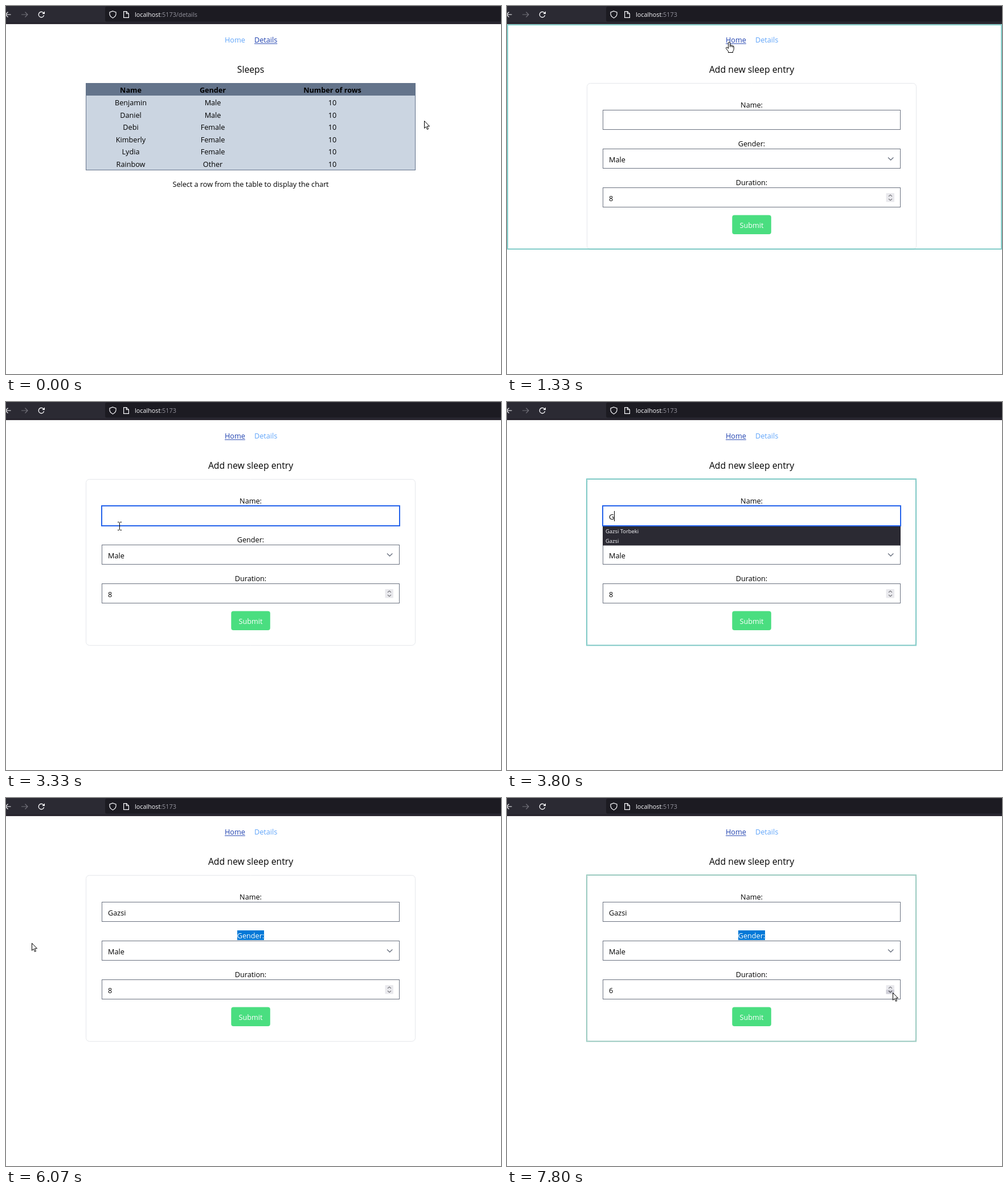
Animation of 869x645 px, one loop 8000 ms. Source, as an HTML page with a canvas:

```html
<!DOCTYPE html>
<html lang="en">
<head>
<meta charset="utf-8">
<title>Sleep entries</title>
<style>
  html, body { margin: 0; width: 100%; height: 100%; overflow: hidden; background: #fff; }
  canvas { display: block; }
</style>
</head>
<body>
<canvas id="stage" width="869" height="645"></canvas>
<script>
const ctx = document.getElementById('stage').getContext('2d');
const LOOP = 8000, TICKS_PER_SECOND = 15;
const FAMILY = '"Open Sans", "Noto Sans", sans-serif';
const BODY = 12.65, TITLE = 15.75, MID = 429.5;
const SLATE = '#64748b', SLATE_LIGHT = '#cbd5e1', SLATE_HOVER = '#94a3b8';
const LINK = '#60a5fa', LINK_HOVER = '#2563eb', LINK_ACTIVE = '#1e40af';
const FLASH = ['#37afa9', '#63b19e', '#80b393', '#97b488', '#abb67d'];

const NAME = 'Gazsi';
const SUGGESTIONS = ['Gazsi Torbeki', NAME];
const PEOPLE = [['Benjamin', 'Male'], ['Daniel', 'Male'], ['Debi', 'Female'],
  ['Kimberly', 'Female'], ['Lydia', 'Female'], ['Rainbow', 'Other']];

// Event times in ticks
const OPEN_HOME = 20, FOCUS = 40, BLUR = 87, MOVE_AGAIN = 82;
const KEYS = [56, 60, 64, 67, 72], KEYS_END = 77;
const CLICKS = [114, 117];

// Pointer path: tick, x, y
const PATH = [
  [0, 734, 201], [1, 720, 197], [4, 600, 150], [7, 362, 62], [8, 354, 70],
  [9, 354, 70], [12, 372, 66], [17, 390, 63], [21, 390, 63], [24, 360, 105],
  [29, 296, 180], [32, 288, 192], [39, 288, 192], [40, 215, 210], [42, 199, 217],
  [81, 199, 217], [82, 199, 213], [83, 172, 230], [84, 55, 253], [86, 55, 253],
  [89, 10, 256], [91, 45, 254], [95, 400, 287], [99, 640, 317], [104, 667, 335],
  [109, 677, 341]
];

function pointerAt(tick) {
  const i = PATH.findIndex(p => p[0] > tick);
  if (i < 0) return PATH[PATH.length - 1].slice(1);
  const [t0, x0, y0] = PATH[i - 1], [t1, x1, y1] = PATH[i];
  const k = (tick - t0) / (t1 - t0);
  return [Math.round(x0 + (x1 - x0) * k), Math.round(y0 + (y1 - y0) * k)];
}

const countUpTo = (list, tick) => list.filter(t => t <= tick).length;

function rect(x, y, w, h, color) {
  ctx.fillStyle = color;
  ctx.fillRect(x, y, w, h);
}

function frame(x, y, w, h, color, width = 1) {
  ctx.strokeStyle = color;
  ctx.lineWidth = width;
  ctx.strokeRect(x, y, w, h);
}

function roundBox(x, y, w, h, r) {
  ctx.beginPath();
  ctx.roundRect(x, y, w, h, r);
}

function text(str, x, y, { size = BODY, color = '#000', align = 'left', weight = 400 } = {}) {
  ctx.font = `${weight} ${size}px ${FAMILY}`;
  ctx.textAlign = align;
  ctx.fillStyle = color;
  ctx.fillText(str, x, y);
  return ctx.measureText(str).width;
}

const centered = (str, x, y, opts) => text(str, x, y, { align: 'center', ...opts });

function line(points, color, width = 1.2) {
  ctx.beginPath();
  points.forEach(([x, y]) => ctx.lineTo(x, y));
  ctx.strokeStyle = color;
  ctx.lineWidth = width;
  ctx.stroke();
}

function strokePath(d, color, width = 1.2) {
  ctx.strokeStyle = color;
  ctx.lineWidth = width;
  ctx.stroke(new Path2D(d));
}

function toolbar(home) {
  const light = '#fbfbfe', dim = '#73727b';
  rect(0, 0, 869, 30, '#2b2a33');
  ctx.fillStyle = '#1c1b22';
  roundBox(174, 1, 710, 26.5, 3);
  ctx.fill();
  rect(0, 30, 869, 1.6, '#0f0b14');

  strokePath('M-2 15H8.5M3.5 10.5L-1 15L3.5 19.5', light);
  strokePath('M27 15H38M33.5 10.5L38 15L33.5 19.5', dim);
  ctx.beginPath();
  ctx.arc(62, 15, 4.7, 0.25, Math.PI * 1.78);
  ctx.strokeStyle = light;
  ctx.lineWidth = 1.4;
  ctx.stroke();
  ctx.fillStyle = light;
  ctx.fill(new Path2D('M68 9.3V14H63.3Z'));

  strokePath('M187.5 9L193 11V14.5Q192.5 18.5 187.5 21Q182.5 18.5 182 14.5V11Z', light);
  strokePath('M206.6 9.6H211.5L215.4 13.4V20.4H206.6ZM211.4 9.6V13.5H215.4', light);

  const w = text('localhost', 226, 19, { size: 10.8, color: light });
  text(home ? ':5173' : ':5173/details', 226 + w, 19, { size: 10.8, color: '#96959f' });
}

function link(label, x, color, underlined) {
  const w = text(label, x, 64, { color });
  if (underlined) rect(x, 65.5, w, 1, color);
}

function nav(home, hover) {
  const homeColor = home ? LINK_ACTIVE : hover ? LINK_HOVER : LINK;
  link('Home', 384, homeColor, home || hover);
  link('Details', 436, home ? LINK : LINK_ACTIVE, !home);
}

const rowAt = (x, y) =>
  x > 141 && x < 718 && y >= 157 && y < 287 ? Math.floor((y - 157) / 21.65) : -1;

function detailsPage(hoverRow) {
  const columns = [219, 363, 573];
  centered('Sleeps', MID, 117, { size: TITLE });
  rect(141, 135, 577, 152.5, SLATE_LIGHT);
  rect(141, 135, 577, 22, SLATE);
  if (hoverRow >= 0) rect(141, 157 + hoverRow * 21.65, 577, 21.65, SLATE_HOVER);
  frame(140.5, 135.5, 578, 152, SLATE);
  ['Name', 'Gender', 'Number of rows'].forEach((label, i) =>
    centered(label, columns[i], 152, { weight: 700 }));
  PEOPLE.forEach((person, row) =>
    [...person, '10'].forEach((cell, i) => centered(cell, columns[i], 174 + row * 21.6)));
  centered('Select a row from the table to display the chart', MID, 317);
}

function field(label, y, value, focused, selected) {
  if (selected) rect(406, y - 18, 47, 17, '#0078d7');
  centered(label, MID, y - 4, { color: selected ? '#fff' : '#000' });
  if (focused) frame(168, y, 523, 35, '#2563eb', 2);
  else frame(168.5, y + 0.5, 522, 34, '#6b7280');
  return 179 + text(value, 179, y + 23.5);
}

function spinner(hover) {
  ctx.fillStyle = '#e9e9ed';
  roundBox(665.5, 328, 14.5, 15.5, 1);
  ctx.fill();
  if (hover) rect(665.5, 336, 14.5, 7.5, '#cfcfd8');
  line([[670, 333.8], [673, 331], [676, 333.8]], '#7a7a80');
  line([[670, 338], [673, 340.8], [676, 338]], hover ? '#4a4a50' : '#7a7a80');
}

function suggestions(hover) {
  rect(168, 218, 523, 33.5, '#2b2a33');
  if (hover) rect(169, 219, 521, 16, '#52525e');
  SUGGESTIONS.forEach((s, i) =>
    text(s, 173, 230.3 + i * 16.7, { size: 9.4, color: '#fbfbfe' }));
}

function flash(x, y, w, h, count) {
  ctx.globalAlpha = 0.62;
  frame(x, y, w, h, FLASH[count - 1], 2);
  ctx.globalAlpha = 1;
}

function homePage(tick, x) {
  const typed = countUpTo(KEYS, tick), clicks = countUpTo(CLICKS, tick);
  const focused = tick >= FOCUS && tick < BLUR;

  centered('Add new sleep entry', MID, 117, { size: TITLE });
  roundBox(140.5, 135.5, 578, 291, 6);
  ctx.strokeStyle = '#e5e7eb';
  ctx.lineWidth = 1;
  ctx.stroke();

  const caretX = field('Name:', 182, NAME.slice(0, typed), focused);
  field('Gender:', 250, 'Male', false, tick >= BLUR);
  field('Duration:', 318, String(8 - clicks));
  line([[669, 265.5], [673.7, 270], [678.4, 265.5]], '#6b7280', 1.4);
  spinner(tick >= 100 && x >= 666);

  ctx.fillStyle = '#4ade80';
  roundBox(395.3, 366.5, 68.5, 33.5, 4);
  ctx.fill();
  centered('Submit', MID, 388.5, { color: '#fff' });

  const caretOn = (tick >= 42 && tick < 50) || (tick >= KEYS[0] && tick < MOVE_AGAIN);
  if (caretOn) rect(Math.round(caretX), 191, 1, 18, '#000');
  if (typed && tick < BLUR) suggestions(tick === 83);

  if (tick < OPEN_HOME + 4) flash(1, 33, 867, 393, 1);
  if (typed && tick < KEYS_END) flash(140, 135, 578, 291.5, typed);
  if (clicks) flash(140, 135, 578, 291.5, clicks);
}

function shape(d, x, y) {
  ctx.save();
  ctx.translate(x, y);
  const path = new Path2D(d);
  ctx.lineJoin = 'round';
  ctx.fillStyle = '#fff';
  ctx.fill(path);
  ctx.strokeStyle = '#000';
  ctx.lineWidth = 1;
  ctx.stroke(path);
  ctx.restore();
}

const cursors = {
  arrow: (x, y) => shape('M.5 .5V13.3L3.4 10.6L5.5 15.4L7.5 14.5L5.4 9.8H9.5Z', x, y),
  hand: (x, y) => shape('M-1.5 1Q0 -1 1.5 1V6Q3 4.8 4 6.3Q5.5 5.5 6.3 7Q8.2 6.5 8.2 8.5V12.5' +
    'Q8 15 6.5 16.5V18.5H-1.5V16.5L-5.3 11.5Q-6 9.5 -4.3 9.3Q-3 9.5 -1.5 11.5ZM1.5 6V9M4 6.5V9M6.3 7V9.5', x, y),
  beam: (x, y) => strokePath(`M${x - 3} ${y - 6.5}h2.5l1 1l1 -1h2.5M${x + 0.5} ${y - 5.5}v12` +
    `M${x - 3} ${y + 7.5}h2.5l1 -1l1 1h2.5`, '#000', 1)
};

function cursorKind(tick, home, overHome, row, x, y) {
  if (overHome || row >= 0) return 'hand';
  if (!home) return 'arrow';
  const inName = tick < MOVE_AGAIN && x > 168 && x < 691 && y > 181 && y < 218;
  const inDuration = x > 168 && x < 665 && y > 318 && y < 353;
  return inName || inDuration ? 'beam' : 'arrow';
}

function render(now) {
  const tick = Math.floor((now % LOOP) / 1000 * TICKS_PER_SECOND + 0.06);
  const home = tick >= OPEN_HOME;
  const [x, y] = pointerAt(tick);
  const overHome = x >= 384 && x < 420 && y > 50 && y < 70;
  const row = home ? -1 : rowAt(x, y);

  rect(0, 0, 869, 645, '#fff');
  toolbar(home);
  nav(home, overHome);
  if (home) homePage(tick, x);
  else detailsPage(row);

  const hidden = tick >= KEYS[0] && tick < MOVE_AGAIN;
  if (!hidden) cursors[cursorKind(tick, home, overHome, row, x, y)](x, y);
}

const start = performance.now();
function loop() {
  render(performance.now() - start);
  requestAnimationFrame(loop);
}
loop();
</script>
</body>
</html>
```
